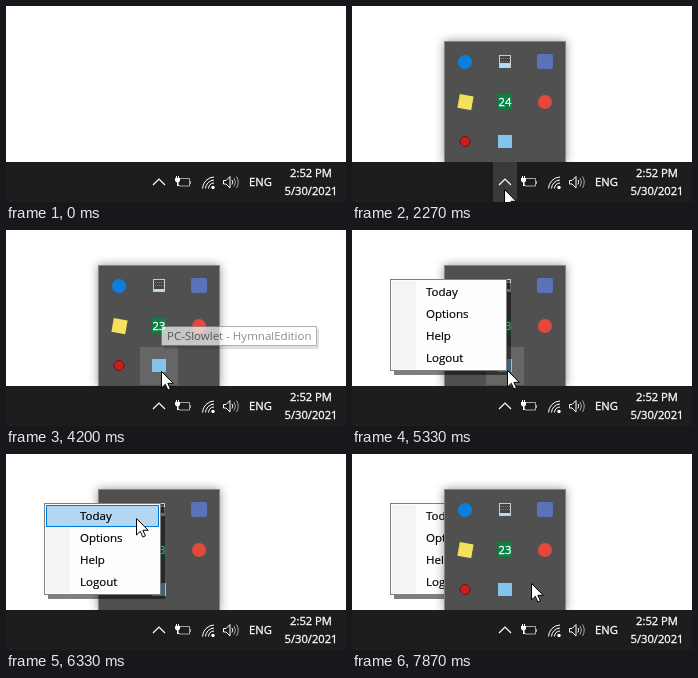
Recreate the animation shown at these times as an HTML page. Size 340 px wide and 196 px high, loop 8 s.

```html
<!DOCTYPE html>
<html lang="en">
<head>
<meta charset="utf-8">
<title>Tray menu</title>
<style>
  html, body { margin: 0; width: 100%; height: 100%; overflow: hidden; background: #fff; }
  svg { display: block; width: 340px; height: 196px; }
  text { font-family: "Open Sans", "Noto Sans", sans-serif; font-size: 11.2px; }
  .bar text, #count { fill: #fff; stroke: #fff; stroke-width: .3px; }
  .line { fill: none; stroke: #fff; }
  .soft { filter: drop-shadow(0 0 5px rgba(0, 0, 0, .42)); }
  .drop { filter: drop-shadow(4px 4px .6px rgba(0, 0, 0, .5)); }
  #menu text { font-size: 11.5px; stroke: #000; stroke-width: .2px; }
</style>
</head>
<body>
<svg viewBox="0 0 340 196">
  <g id="layers">
    <g id="popup">
      <rect class="soft" x="92" y="35" width="122" height="122" fill="#505050"/>
      <rect x="92.5" y="35.5" width="121" height="122" fill="none" stroke="#858585"/>
      <rect id="cell" x="134" y="117" width="38" height="38" fill="#666"/>
      <circle cx="113" cy="56" r="7" fill="#0a7fe0"/>
      <rect x="147.5" y="49.5" width="11" height="12" fill="#444" stroke="#c8ccce"/>
      <path d="M149 52.5h9M149 55.5h9" stroke="#7b858a" stroke-dasharray="1 1"/>
      <rect id="level" x="148" width="10" fill="#b4dcf2"/>
      <rect x="185" y="48" width="16" height="15" rx="2" fill="#5a72b8"/>
      <rect x="106.5" y="89" width="14" height="14" fill="#f5e25c" transform="rotate(10 113 96)"/>
      <rect x="146" y="88" width="14" height="15" fill="#0b8043"/>
      <text id="count" x="153" y="100"></text>
      <circle cx="193" cy="96" r="7" fill="#e2493a"/>
      <circle cx="113" cy="135.5" r="5" fill="#c81e1e" stroke="#6e1212"/>
      <rect x="146" y="129" width="14" height="13" fill="#83c4ea"/>
    </g>
    <g id="menu">
      <rect class="drop" x="38" y="49" width="117" height="92" fill="#fff"/>
      <rect x="38.5" y="49.5" width="116" height="91" fill="#fdfdfd" stroke="#808080"/>
      <rect x="40" y="51" width="24" height="88" fill="#f4f4f4"/>
      <rect id="pick" x="40.5" width="112" height="21" fill="#b3d7f3" stroke="#0078d7"/>
    </g>
  </g>
  <g class="bar">
    <rect y="156" width="340" height="40" fill="#1d1d1d"/>
    <rect id="button" y="156" height="40" fill="#393939"/>
    <path class="line" d="M147 179l6-6 6 6" stroke-width="1.2"/>
    <path class="line" d="M174 172.5h9.500v7.500h-10M184.500 175v3" stroke-opacity=".6"/>
    <path d="M169 172h1v-2h1v2h1v-2h1v2h1v3l-1.500 1.500v2.500h1v1h-2.500v-3.500L169 175z" fill="#fff"/>
    <path class="line" d="M196.500 182.500a12 12 0 0 1 11.500-11.500M199.500 182.500a9 9 0 0 1 8.500-8.500M202.500 182.500a6 6 0 0 1 5.500-5.500"/>
    <circle cx="207" cy="181.5" r="1.7" fill="#fff"/>
    <path class="line" d="M217.500 174.500h2.500l4-4v11.500l-4-4h-2.500zM226 174q1.500 2.200 0 4.500"/>
    <path class="line" d="M228 172q3 4.200 0 8.500M230.500 170.500q3.500 5.700 0 11.500" stroke-opacity=".6"/>
    <text x="243" y="180">ENG</text>
    <text x="305" y="171" text-anchor="middle">2:52 PM</text>
    <text x="305" y="189" text-anchor="middle">5/30/2021</text>
  </g>
  <g id="tip">
    <rect x="158" y="99" width="155" height="20" fill="#000" opacity=".18"/>
    <rect x="155.5" y="96.5" width="155" height="19" fill="#fff" stroke="#8c8c8c"/>
    <text x="161" y="110" fill="#575757" style="font-size:11.5px">PC-Slowlet - HymnalEdition</text>
  </g>
  <path id="cursor" d="M.5.5V17l3.800-3.700 2.500 5.700 2.600-1.100-2.500-5.600h5.300z" fill="#fff" stroke="#000"/>
</svg>
<script>
const $ = id => document.getElementById(id);
const LOOP = 8000, STEP = 200 / 3;

// Pointer path: time, x, y
const path = [
  [330, 313, 69], [1130, 187, 119], [1600, 152, 183], [2810, 152, 183],
  [3130, 180, 154], [3670, 158, 142], [3800, 155, 141], [5270, 155, 141],
  [6130, 134, 76], [6330, 130, 64], [6610, 130, 64], [7200, 133, 126],
  [7340, 133, 126], [7730, 179, 129], [LOOP, 179, 129]
];

["Today", "Options", "Help", "Logout"].forEach((label, i) => {
  const text = document.createElementNS("http://www.w3.org/2000/svg", "text");
  text.textContent = label;
  text.setAttribute("x", 74);
  text.setAttribute("y", 66 + 22 * i);
  $("menu").append(text);
});
$("count").setAttribute("text-anchor", "middle");

const clamp = v => Math.max(0, Math.min(1, v));
const set = (id, name, value) => $(id).setAttribute(name, value);
const show = (id, alpha) => set(id, "opacity", +alpha);

// Slope through a path point, zero next to a pause
function slope(i, axis) {
  const a = path[Math.max(0, i - 1)], p = path[i], b = path[Math.min(path.length - 1, i + 1)];
  const paused = (i > 0 && a[axis] === p[axis]) || b[axis] === p[axis];
  return paused ? 0 : (b[axis] - a[axis]) / (b[0] - a[0]);
}

function pointer(t) {
  t = Math.max(path[0][0], t);
  let i = 0;
  while (i < path.length - 2 && t >= path[i + 1][0]) i++;
  const a = path[i], b = path[i + 1], d = b[0] - a[0], u = clamp((t - a[0]) / d), v = 1 - u;
  return [1, 2].map(k => Math.round(
    v * v * (1 + 2 * u) * a[k] + u * u * (3 - 2 * u) * b[k] +
    d * u * v * (v * slope(i, k) - u * slope(i + 1, k))));
}

function draw(t) {
  const [x, y] = pointer(t);
  set("cursor", "transform", `translate(${x} ${y})`);
  show("cursor", t >= 330);

  // Hover follows the pointer one step late
  const [hx, hy] = pointer(t - STEP);
  const within = (l, top, r, bottom) => hx >= l && hx < r && hy >= top && hy < bottom;
  const inMenu = t >= 5000 && within(38, 51, 155, 139);
  const onArrow = hx < 165;
  show("button", within(141, 156, 188, 196));
  set("button", "x", onArrow ? 141 : 166);
  set("button", "width", onArrow ? 24 : 22);
  show("cell", !inMenu && within(134, 117, 172, 155));
  show("pick", inMenu);
  set("pick", "y", 51.5 + 22 * Math.floor((hy - 51) / 22));

  const late = t >= 4000;
  $("count").textContent = late ? 23 : 24;
  set("level", "y", late ? 59 : 57);
  set("level", "height", late ? 2 : 4);

  show("popup", clamp((t - 2003) / 267));
  show("tip", t < 4730 ? clamp((t - 3930) / 400) : 0);
  show("menu", t < 4870 ? 0 : t < 5000 ? .5 : 1);
  $("layers").append($(t >= 7870 ? "popup" : "menu"));
}

function tick() {
  const k = Math.floor((performance.now() % LOOP + 4) / STEP) % (LOOP / STEP);
  draw(Math.round(k * STEP / 10) * 10);
  requestAnimationFrame(tick);
}
tick();
</script>
</body>
</html>
```
